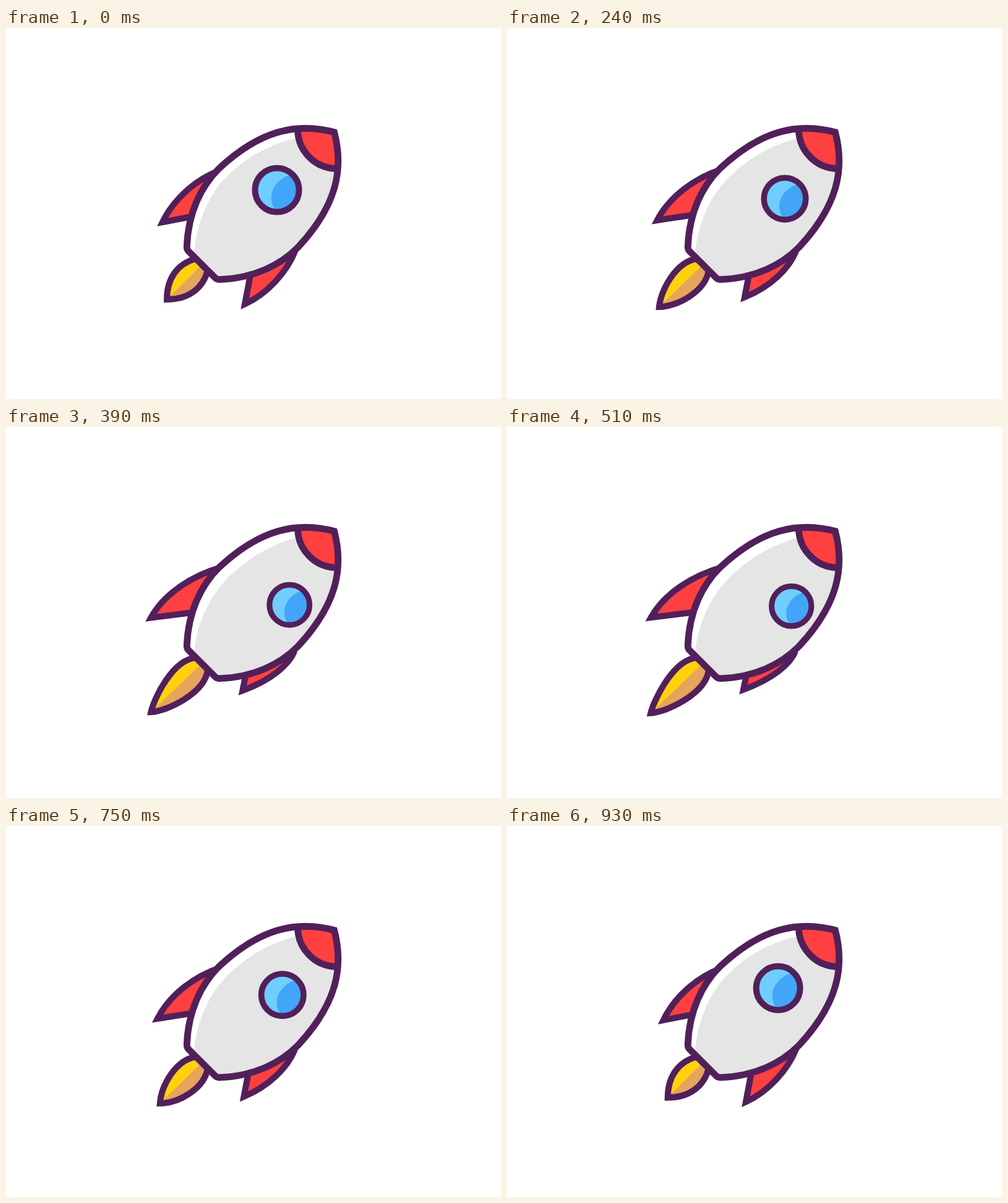
Recreate the animation shown at these times as an HTML page. Size 800 by 600 pixels, loop 960 ms.

```html
<!DOCTYPE html>
<html lang="en">
<head>
<meta charset="utf-8">
<title>Rocket</title>
<style>
  html, body { margin: 0; width: 100%; height: 100%; overflow: hidden; background: #fff; }
  svg { display: block; width: 800px; height: 600px; }
  .line { stroke: #51205a; stroke-width: 10; stroke-miterlimit: 8; }
  .bold { stroke-width: 10.8; }
  .red { fill: #ff4040; }
</style>
</head>
<body>
<svg viewBox="0 0 800 600" fill="none">
  <defs>
    <path id="hull" d="M530.5 168.5C470 152.5 411 165 344.5 227C315 256 294.5 299 292.3 353Q292 358 295 361L338 404Q341 407 346 406.7C400 404.5 443 384 472 354.5C534 288 546.5 229 530.5 168.5Z"/>
    <clipPath id="inside"><use href="#hull"/></clipPath>
  </defs>

  <path id="leftFin" class="line red"/>
  <path id="rightFin" class="line red"/>
  <path id="flame" fill="#ffd10d"/>
  <path id="flameShade" fill="#e6a45c"/>
  <path id="flameLine" class="line"/>

  <use href="#hull" fill="#fff"/>
  <g clip-path="url(#inside)">
    <path id="shade" fill="#e5e5e5"/>
    <path class="line bold red" d="M471.5 150V165C472 199 500 227 534 227.5H560V140H471.5Z"/>
  </g>
  <use href="#hull" class="line bold"/>

  <g id="porthole">
    <circle r="33" fill="#70cdff"/>
    <path fill="#42a5f7" d="M22 -25C0 -18 -19 5 -4 32A33 33 0 0 0 22 -25Z"/>
    <circle class="line" r="35.5"/>
  </g>
</svg>
<script>
  const PERIOD = 960;
  const el = id => document.getElementById(id);
  const mix = (a, b, p) => a + (b - a) * p;

  // Each shape: path at rest, path at full roll.
  const shapes = {
    leftFin: [
      'M344 231C305 246 270 278 253 314L300 305',
      'M350 226C300 240 255 268 232.5 308L302 299.5'
    ],
    rightFin: [
      'M468 359C454 395 422 430 386 446.5L395 399',
      'M466 363C458 383 430 407 382 424.5L386 405'
    ],
    flame: [
      'M260 439C260 405 277 381 307 373L326 392C318 422 294 439 260 439Z',
      'M232 463C237 443 268 376 307 373L326 392C323 431 256 462 232 463Z'
    ],
    flameShade: [
      'M260 439L316 383L326 392C318 422 294 439 260 439Z',
      'M232 463L316 383L326 392C323 431 256 462 232 463Z'
    ],
    shade: [
      'M475 177C430 186 390 207 357 240C325 272 308 318 304 362L341 420L560 420V177Z',
      'M475 177C433 189 393 210 360 243C328 275 309 318 304 362L341 420L560 420V177Z'
    ]
  };
  shapes.flameLine = shapes.flame;

  function morph([from, to], p) {
    const ends = to.match(/[\d.]+/g);
    let i = 0;
    return from.replace(/[\d.]+/g, n => mix(+n, +ends[i++], p).toFixed(2));
  }

  function draw(now) {
    const p = (1 - Math.cos(now / PERIOD * 2 * Math.PI)) / 2;
    for (const id in shapes) el(id).setAttribute('d', morph(shapes[id], p));
    el('porthole').setAttribute('transform',
      `translate(${mix(438, 460, p)} ${mix(262, 290, p)}) scale(${mix(1, 0.905, p)})`);
  }

  const start = performance.now();
  function tick() {
    draw(performance.now() - start);
    requestAnimationFrame(tick);
  }
  tick();
</script>
</body>
</html>
```
